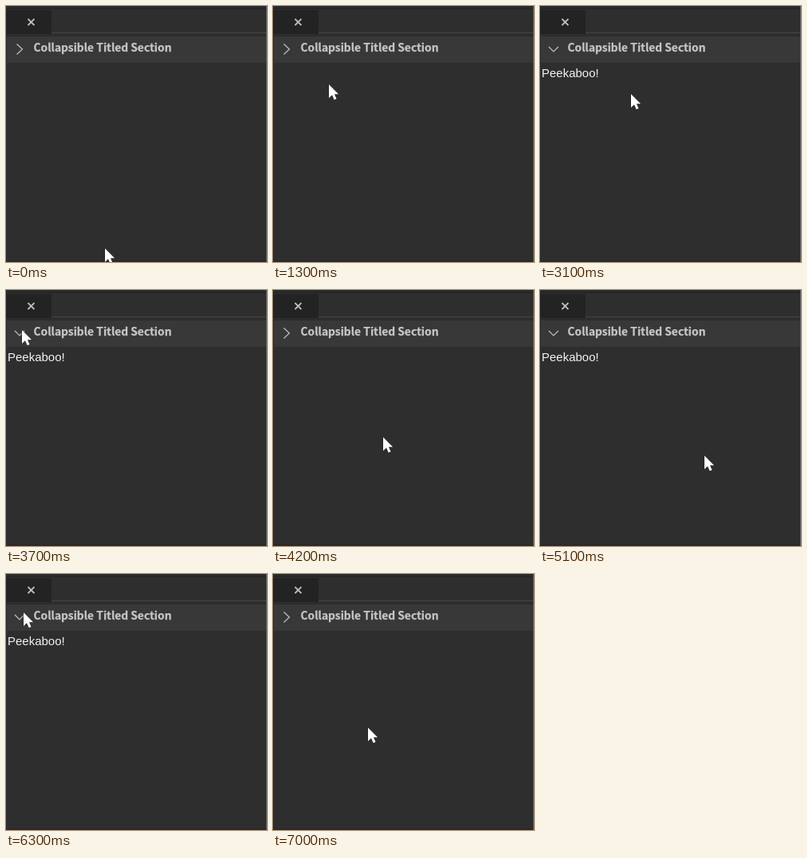
These frames come from a looping animation (327 px wide and 320 px high, 7.9 s). An HTML page:

```html
<!DOCTYPE html>
<html lang="en">
<head>
<meta charset="utf-8">
<title>Collapsible section</title>
<style>
  html, body { margin: 0; width: 100%; height: 100%; overflow: hidden; background: #2e2e2e; }
  svg { display: block; width: 327px; height: 320px; }
  .title {
    font: 700 13.8px "Noto Sans CJK JP", "Noto Sans CJK SC", "Noto Sans CJK", "Open Sans", sans-serif;
    fill: #c6c6c6; stroke: #c6c6c6; stroke-width: .25;
  }
  .body { font: 15px "Liberation Sans", Arial, sans-serif; fill: #f2f2f2; }
  .line { fill: none; stroke: #c0c0c0; }
</style>
</head>
<body>
<svg viewBox="0 0 327 320">
  <rect width="327" height="320" fill="#2e2e2e"/>
  <rect width="327" height="3" fill="#2a2a2a"/>
  <rect y="3" width="327" height="1" fill="#252525"/>
  <rect y="5" width="57" height="30" fill="#232323"/>
  <rect x="57" y="33" width="270" height="1" fill="#464646"/>
  <rect y="37" width="327" height="34" fill="#2a2a2a"/>
  <rect x="1" y="38" width="326" height="33" fill="#383838"/>
  <rect y="318" width="327" height="2" fill="#292929"/>
  <rect x="326" width="1" height="320" fill="#6c6c6c"/>
  <path class="line" stroke-width="1.9" d="M27.5 16.2l8 8m0-8l-8 8"/>
  <path class="line" id="chevron" stroke-width="1.2"/>
  <text class="title" x="34.5" y="57.4">Collapsible Titled Section</text>
  <text class="body" id="content" x="2" y="89">Peekaboo!</text>
  <path id="cursor" fill="#fff" stroke="#1c1c1c" stroke-width="1" stroke-linejoin="round"
    paint-order="stroke" d="M0 0V17L4 13.3L6.7 19.2L9.6 18L7 12.2H12.2Z"/>
</svg>
<script>
const LOOP = 7900, STEP = 100;
const CLOSED = 'M13.5 47.5L20.5 54L13.5 60.5';
const OPEN = 'M11 51L17 57L23 51';
const toggles = [2200, 3800, 4800, 6400];

// Mouse turning points and rests: time, x, y.
const keys = [
  [0, 124, 303], [800, 18, 62], [900, 18, 60], [1200, 18, 60],
  [1300, 70, 98], [1500, 138, 116], [2000, 21, 50], [2300, 18, 55], [2400, 18, 55],
  [2900, 120, 114], [3000, 120, 114], [3700, 20, 50], [3800, 20, 50],
  [4200, 138, 184], [4400, 216, 225], [4700, 22, 50], [4800, 22, 50],
  [5100, 206, 207], [5300, 244, 260], [5400, 244, 260], [6200, 22, 50],
  [6300, 22, 48], [6500, 22, 48], [7000, 119, 192], [LOOP, 119, 192]
];

const $ = id => document.getElementById(id);
const chevron = $('chevron'), content = $('content'), cursor = $('cursor');

function slope(i, axis) {
  const a = keys[i], b = keys[i + 1];
  return a && b ? (b[axis] - a[axis]) / (b[0] - a[0]) : 0;
}

// Zero at rests and turns, so the path never overshoots a key.
function speed(i, axis) {
  const before = slope(i - 1, axis), after = slope(i, axis);
  return before * after > 0 ? 2 * before * after / (before + after) : 0;
}

// Cubic Hermite curve between neighbouring keys.
function glide(t, axis) {
  const i = keys.findIndex(key => key[0] > t) - 1;
  const a = keys[i], b = keys[i + 1];
  const span = b[0] - a[0], u = (t - a[0]) / span, v = 1 - u;
  return a[axis] * v * v * (1 + 2 * u) + b[axis] * u * u * (3 - 2 * u)
    + span * u * v * (v * speed(i, axis) - u * speed(i + 1, axis));
}

function draw(t) {
  const open = toggles.filter(time => time <= t).length % 2 === 1;
  chevron.setAttribute('d', open ? OPEN : CLOSED);
  content.setAttribute('visibility', open ? 'visible' : 'hidden');
  const [x, y] = [1, 2].map(axis => Math.round(glide(t, axis)));
  cursor.setAttribute('transform', `translate(${x} ${y})`);
}

const begin = performance.now();
function tick() {
  const t = Math.max(0, performance.now() - begin) % LOOP;
  draw(Math.floor(t / STEP) * STEP);
  requestAnimationFrame(tick);
}
tick();
</script>
</body>
</html>
```
